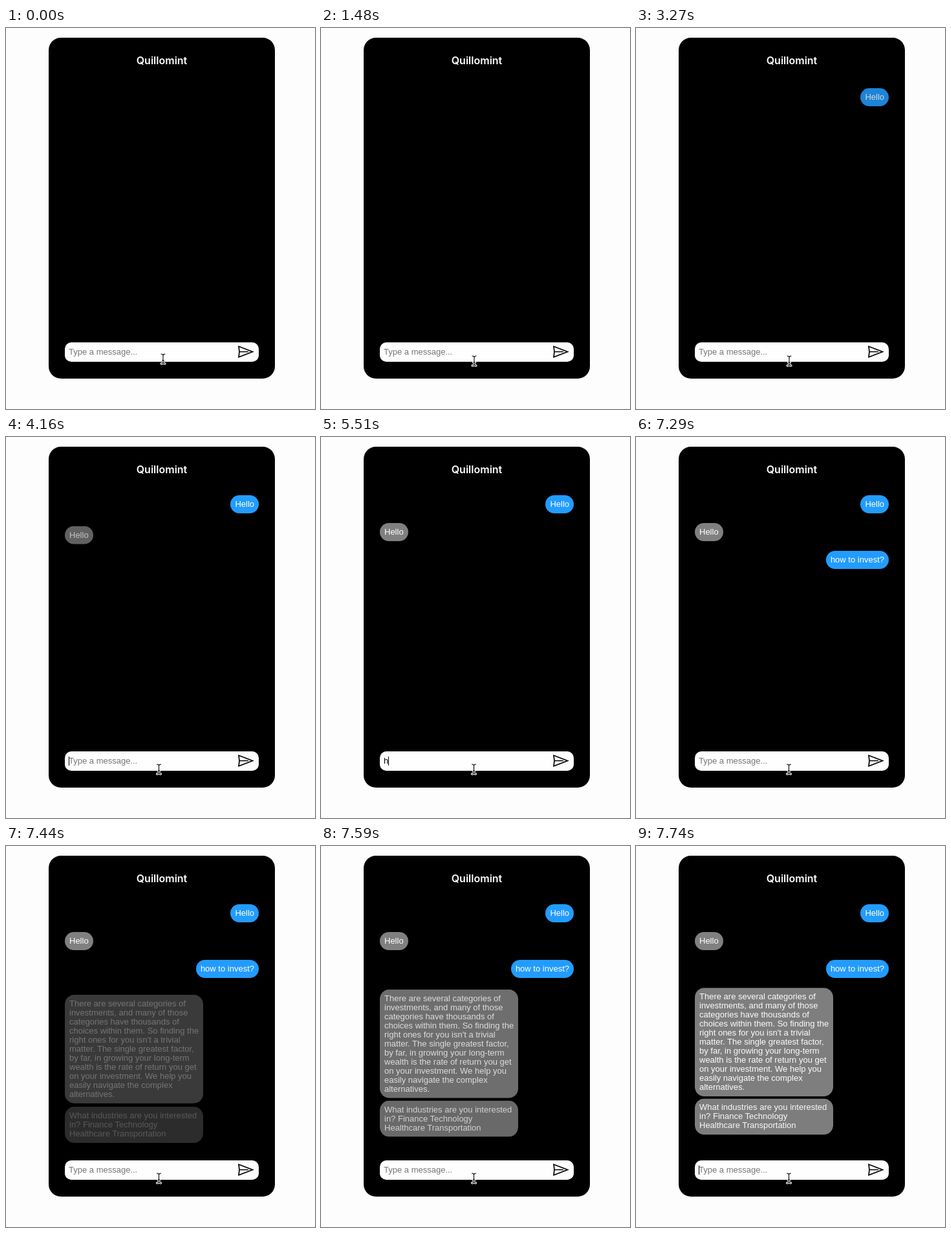
An HTML page that plays this animation: 478 px wide and 589 px high, repeating every 8000 ms.

```html
<!DOCTYPE html>
<html lang="en">
<head>
<meta charset="utf-8">
<title>Chat</title>
<style>
  html, body { margin: 0; width: 100%; height: 100%; overflow: hidden; background: #fdfdfd; }
  body { position: relative; font: 13px/14px "Liberation Sans", Arial, sans-serif; }
  body > * { position: absolute; white-space: pre; }
  #card { left: 66px; top: 15px; width: 350px; height: 527px; border-radius: 19px; background: #000; }
  h1 { left: 66px; top: 40px; width: 350px; margin: 0; color: #fff; text-align: center;
       font: 600 16px/20px Inter, sans-serif; }
  .bubble { padding: 7px; border-radius: 15px; color: #fff; }
  .user { right: calc(100% - 391px); background: #239cff; }
  .bot { left: 91px; background: #808080; }
  .long { width: 200px; }
  #input { left: 91px; top: 486px; width: 300px; height: 30px; border-radius: 10px; background: #fefefe; }
  #input span { position: absolute; left: 6px; top: 8px; }
  #hint { color: #757575; }
  #caret { position: absolute; left: 100%; top: 0; width: 1px; height: 14px; background: #000; }
  svg { left: 0; top: 0; }
</style>
</head>
<body>
<div id="card"></div>
<h1>Quillomint</h1>
<div class="bubble user" style="top:90px" data-start="3003">Hello</div>
<div class="bubble bot" style="top:133px" data-start="3940">Hello</div>
<div class="bubble user" style="top:176px" data-start="6700">how to invest?</div>
<div class="bubble bot long" style="top:219px" data-start="7314">There are several categories of
investments, and many of those
categories have thousands of
choices within them. So finding the
right ones for you isn't a trivial
matter. The single greatest factor,
by far, in growing your long-term
wealth is the rate of return you get
on your investment. We help you
easily navigate the complex
alternatives.</div>
<div class="bubble bot long" style="top:390px" data-start="7339">What industries are you interested
in? Finance Technology
Healthcare Transportation</div>
<div id="input"><span id="hint">Type a message...</span><span><b id="typed" style="font-weight:400"></b><i id="caret"></i></span></div>
<svg width="478" height="589" fill="none">
  <path d="M360 492.3L381.5 500.5 360 508.8 361 500.5ZM361 500.5H375" stroke="#000" stroke-width="1.7"/>
  <g id="beam" stroke-linecap="round">
    <path id="beamShape" d="M-3-7.5Q0-7.5 0-5Q0-7.5 3-7.5M0-5V5M-3 7.5Q0 7.5 0 5Q0 7.5 3 7.5M-1.5 2.5H1.5" stroke="#fff" stroke-width="2.8"/>
    <use href="#beamShape" style="stroke:#000"/>
    <path d="M-3-7.5Q0-7.5 0-5Q0-7.5 3-7.5M0-5V5M-3 7.5Q0 7.5 0 5Q0 7.5 3 7.5M-1.5 2.5H1.5" stroke="#000" stroke-width="1.1"/>
  </g>
  <path id="arrow" d="M0 0V15.5L3.6 12.2 6 17.6 8.6 16.5 6.2 11.2H10.5Z" fill="#000" stroke="#fff"/>
</svg>
<script>
const LOOP = 8000, TICK = 149, LEAD = 14;
const byId = id => document.getElementById(id);

const bubbles = [...document.querySelectorAll('.bubble')].map(el => {
  const entry = el.animate(
    [{ opacity: 0, transform: 'translateY(20px)' }, { opacity: 1, transform: 'none' }],
    { duration: 500, easing: 'ease', fill: 'both' });
  entry.pause();
  return { entry, start: +el.dataset.start };
});

// Each row: start time, then the value held from there on.
const greeting = [[0, ''], [1930, 'H'], [2080, 'He'], [2680, 'Hell'], [2830, 'Hello'], [2980, '']];
const caretShown = [[0, 0], [880, 1], [1480, 0], [1930, 1], [3120, 0], [3720, 1],
                    [4310, 0], [4910, 1], [7140, 0], [7740, 1]];
const pointer = [[0, 'beam', 243, 511.5], [150, 'arrow', 242.5, 529], [300, 'arrow', 241, 525],
                 [450, 'beam', 238, 515], [590, 'beam', 237, 514.5], [4160, 'beam', 236.5, 513.5]];
const held = (rows, t) => rows.filter(row => row[0] <= t).pop().slice(1);

function typedText(t) {
  if (t < 5510) return held(greeting, t)[0];
  return t < 6700 ? 'how to invest?'.slice(0, 1 + Math.floor((t - 5510) / (TICK / 2))) : '';
}

function draw(now) {
  const t = TICK * Math.min(52, Math.floor((now % LOOP + LEAD) / TICK));
  for (const { entry, start } of bubbles) entry.currentTime = Math.min(500, Math.max(0, t - start));

  const text = typedText(t);
  byId('typed').textContent = text;
  byId('hint').style.visibility = text ? 'hidden' : 'visible';
  byId('caret').style.visibility = held(caretShown, t)[0] ? 'visible' : 'hidden';

  const [shape, x, y] = held(pointer, t);
  for (const id of ['beam', 'arrow']) {
    byId(id).setAttribute('transform', `translate(${x} ${y})`);
    byId(id).style.display = id === shape ? '' : 'none';
  }
}

const begin = performance.now();
(function loop() {
  draw(performance.now() - begin);
  requestAnimationFrame(loop);
})();
</script>
</body>
</html>
```
